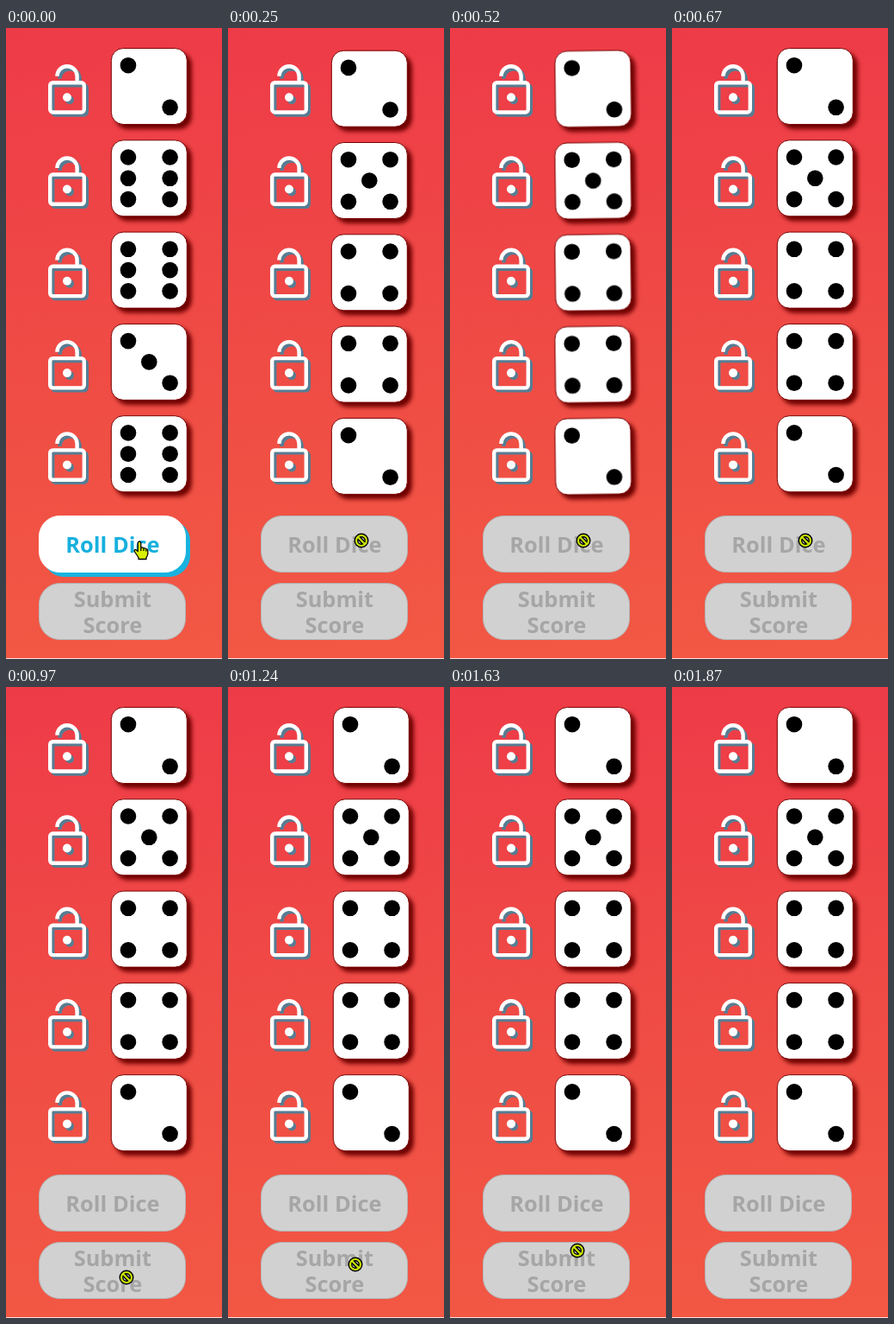
Recreate the animation shown at these times as an HTML page. Size 251 by 730 pixels, loop 2400 ms.

```html
<!DOCTYPE html>
<html lang="en">
<head>
<meta charset="utf-8">
<title>Dice roll</title>
<style>
  html, body { margin: 0; width: 100%; height: 100%; overflow: hidden; }
  body { background: linear-gradient(175deg, #ee3b48, #f05044 68%, #f25844); }
  svg { display: block; position: absolute; left: 0; top: 0; }
  text { font: bold 25.4px "Noto Sans", "Open Sans", sans-serif; text-anchor: middle; }
  .lock { fill: none; stroke: #fff; stroke-width: 4.4; filter: drop-shadow(3px 3px 0.5px #567d93); }
  .die { filter: drop-shadow(5px 5px 2.5px #6d0000); }
  .face { fill: #fff; stroke: #7a0000; stroke-width: 1; }
  .off rect { fill: #d1d1d1; stroke: #b4b4b4; }
  .off text { fill: #a6a6a6; }
  .on rect { fill: #fff; stroke: #fff; filter: drop-shadow(5px 5px 0 #19b2de); }
  .on text { fill: #16b0de; }
</style>
</head>
<body>
<svg width="251" height="730" viewBox="0 0 251 730">
  <rect y="729" width="251" height="1" fill="#fbe3df"/>
  <g id="locks"></g>
  <g id="dice"></g>
  <g id="roll">
    <rect x="38.5" y="564.5" width="170" height="65" rx="24"/>
    <text x="123.9" y="607">Roll Dice</text>
  </g>
  <g class="off">
    <rect x="38.5" y="642.5" width="170" height="65" rx="24"/>
    <text x="123.9" y="670">Submit</text>
    <text x="123.9" y="700">Score</text>
  </g>
  <g id="hand" fill="#d8f000" stroke="#000" stroke-width="1.3" stroke-linejoin="round">
    <path d="M-1.8 1.5Q0-1.5 1.8 1.5V7.5Q3.5 6 5 8Q6.6 7 7.8 9Q9.8 8.4 9.8 11V14.5Q9.4 17 8 18.5V20.5H-1V18.5L-5.8 11.5Q-6.2 9-3.8 9.6L-1.8 11.5Z"/>
    <path d="M1.8 8V11M5 8.5V11M7.8 9.5V11.5" fill="none"/>
  </g>
  <g id="deny" fill="none">
    <g stroke="#000" stroke-width="5"><circle r="6"/><path d="M-4.2-4.2L4.2 4.2"/></g>
    <g stroke="#cbe600" stroke-width="2.2"><circle r="6"/><path d="M-4.2-4.2L4.2 4.2"/></g>
  </g>
  <path id="arrow" d="M0 0V16L4 12.5L6.5 18.5L9 17.3L6.5 11.5H11.5Z" fill="#d8f000" stroke="#000"/>
</svg>
<script>
const LOOP = 2400, PITCH = 106.3, PIP = 24.3;
const byId = id => document.getElementById(id);
const cursors = ["hand", "deny", "arrow"];

// time, x, y, degrees
const shake = [
  [0, 0, 0, 0], [250, -2, 2.7, 0], [370, 2.3, 5.9, 0],
  [520, 0, 2.8, -0.8], [670, 0, 0, 0]
];

// time, cursor, x, y
const pointer = [
  [0, "hand", 155, 594], [250, "deny", 155, 593], [970, "deny", 140, 683],
  [1100, "arrow", 138, 718], [1240, "deny", 148, 668], [1370, "deny", 158, 587],
  [1480, "deny", 155, 597], [1630, "deny", 148, 652], [1750, "arrow", 130, 718],
  [1870, "", 0, 0]
];

const rolls = [[2, 6, 6, 3, 6], [2, 5, 4, 4, 2]];

function spots(n) {
  const list = [[-1, -1], [1, 1]];
  if (n > 3) list.push([1, -1], [-1, 1]);
  if (n % 2) list.push([0, 0]);
  if (n === 6) list.push([-1, 0], [1, 0]);
  return list;
}

function dieFace(n) {
  const pips = spots(n).map(([x, y]) => `<circle cx="${x * PIP}" cy="${y * PIP}" r="9.3"/>`);
  return '<rect class="face" x="-44" y="-44" width="88" height="88" rx="14"/>' + pips.join("");
}

byId("locks").innerHTML = rolls[0].map((_, i) => `
  <g class="lock" transform="translate(0 ${i * PITCH})">
    <rect x="51.2" y="63.2" width="39.6" height="34.3" rx="3.3"/>
    <path d="M59.4 55.8A11.6 11.6 0 0 1 82.6 55.8V63"/>
    <circle cx="71" cy="80.2" r="5" fill="#fff" stroke="none"/>
  </g>`).join("");

byId("dice").innerHTML = rolls[0].map(() => '<g class="die"></g>').join("");
const dice = [...document.querySelectorAll(".die")];

const stepAt = (steps, t) => steps.filter(s => s[0] <= t).pop();

let shownRoll = -1;
function draw(t) {
  const rolled = t < 250 ? 0 : 1;
  if (rolled !== shownRoll) {
    dice.forEach((die, i) => { die.innerHTML = dieFace(rolls[rolled][i]); });
    byId("roll").setAttribute("class", rolled ? "off" : "on");
    shownRoll = rolled;
  }
  const [, dx, dy, turn] = stepAt(shake, t);
  dice.forEach((die, i) => {
    die.setAttribute("transform",
      `translate(${166.3 + dx} ${67.5 + i * PITCH + dy}) rotate(${turn})`);
  });
  const [, kind, x, y] = stepAt(pointer, t);
  for (const id of cursors) {
    const el = byId(id);
    el.style.display = id === kind ? "" : "none";
    el.setAttribute("transform", `translate(${x} ${y})`);
  }
}

const start = performance.now();
function tick() {
  draw((performance.now() - start) % LOOP);
  requestAnimationFrame(tick);
}
tick();
</script>
</body>
</html>
```
